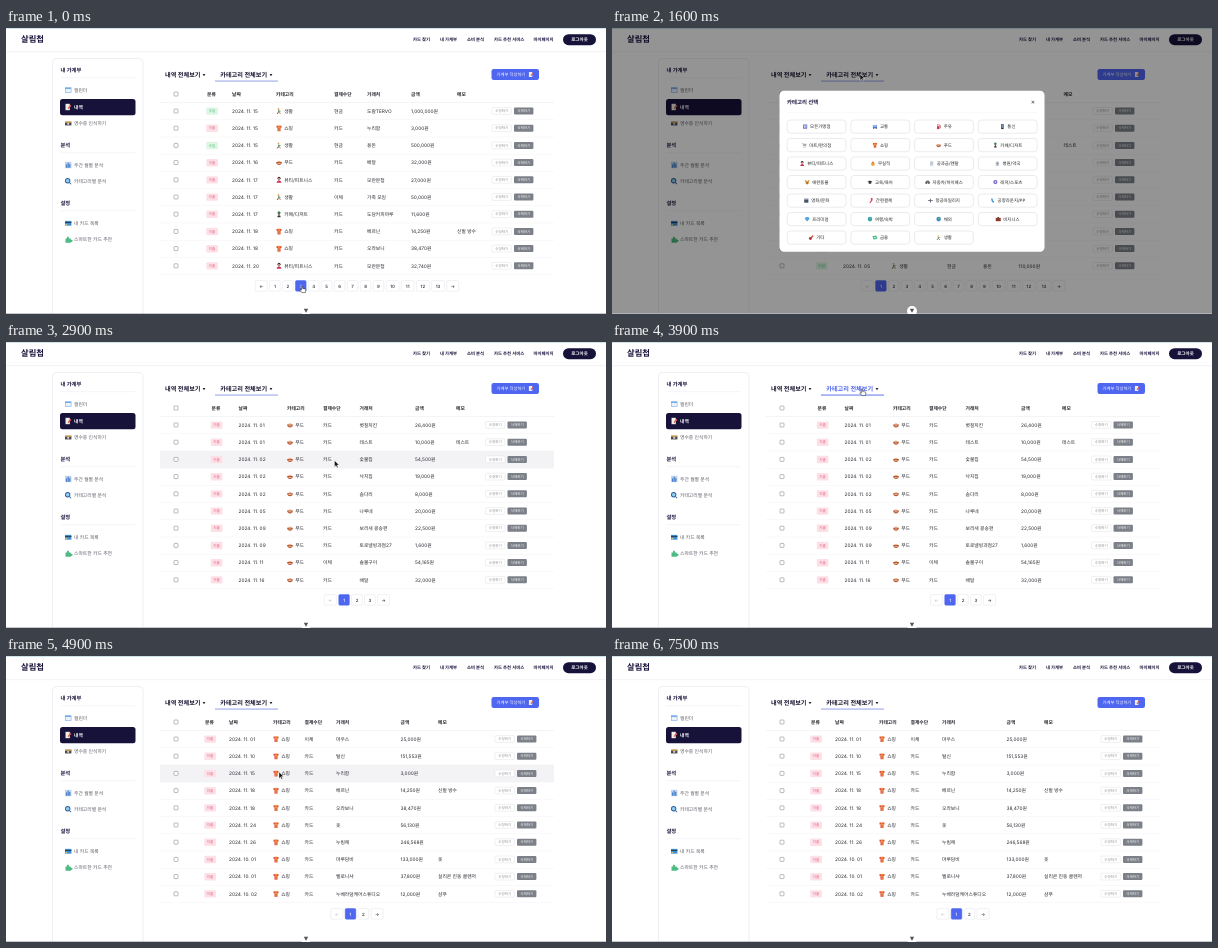
Write an HTML page that moves like this. It is 600 px wide and 286 px high and loops after 7700 ms.

```html
<!DOCTYPE html>
<html lang="ko">
<head>
<meta charset="utf-8">
<title>가계부</title>
<style>
  html, body { margin: 0; width: 100%; height: 100%; overflow: hidden; background: #fff; }
  svg { display: block; width: 600px; height: 286px; }
  text { font-family: Inter, 'Noto Sans CJK KR', 'Noto Sans CJK', sans-serif; text-rendering: geometricPrecision; white-space: pre; }
  .off { display: none; }
  .opt rect { fill: #fff; stroke: #e2e3e9; }
  .opt text { fill: #222; }
  .opt.hover rect { fill: #f5f7ff; stroke: #5a70f2; }
  .opt.hover text { fill: #5a70f2; }
  .opt.on rect { fill: #4f66f0; stroke: #4f66f0; }
  .opt.on text { fill: #fff; }
  #tab { fill: #16132e; }
  #tabLine { fill: #8c96e6; }
  .lit #tab, .lit #tabLine { fill: #4f66f0; }
</style>
</head>
<body>
<svg id="stage" viewBox="0 0 600 286"></svg>
<script>
const LOOP = 7700, STEP = 100, ROW0 = 83, PITCH = 17.2;
const INK = '#16123a', BLUE = '#4f66f0';

// Drawing helpers
const text = (s, x, y, size = 4.8, o = {}) =>
  `<text x="${x}" y="${y + size * 0.36}" font-size="${size}px" font-weight="${o.w || 400}"` +
  ` text-anchor="${o.a || 'start'}"${o.id ? ` id="${o.id}"` : ` fill="${o.c || '#26262e'}"`}>${s}</text>`;
const mid = (s, x, y, size, c, w) => text(s, x, y, size, { a: 'middle', c, w });
const rect = (x, y, w, h, fill, r = 0, more = '') =>
  `<rect x="${x}" y="${y}" width="${w}" height="${h}" rx="${r}" fill="${fill}" ${more}/>`;
const edge = (c, w = 0.5) => `stroke="${c}" stroke-width="${w}"`;
const dot = (x, y, r) => `M${x - r} ${y}a${r} ${r} 0 1 0 ${2 * r} 0a${r} ${r} 0 1 0 ${-2 * r} 0z`;
const box = (x, y, w, h) => `M${x} ${y}h${w}v${h}h${-w}z`;

// Small pictograms on a 12 x 12 grid: colour, path, colour, path ...
const person = c => ['#3a2530', dot(6, 3, 3), '#f0b98c', dot(6, 4, 1.8), c, 'M1 12q1-5 5-5t5 5z'];
const car = c => [c, 'M0 5h2l2-3h5l2 3h1v4h-12z', '#333', dot(3, 9, 1.5) + dot(9, 9, 1.5)];
const globe = c => [c, dot(6, 6, 5.5), '#67b96b', 'M3 3l4-1 1 3-3 2zM6 8l4-1-2 4z'];
const sheet = c => ['#d7dce6', box(2, 0, 8, 12), c, box(3, 2, 6, 1) + box(3, 5, 6, 1) + box(3, 8, 4, 1)];
const runner = ['#e8a35d', dot(5, 2, 1.8), '#6f9c77', 'M4 4l4 1 2 2-2 0-1 0 0 2-3 0z', '#8a6544', 'M4 8l2 1-3 3h-2zM6 8l3 2v2h-1z'];
const ICONS = {
  '캘린더': ['#6da7e6', box(0, 1, 12, 10), '#e9f3fd', box(1, 4, 10, 6)],
  '내역': ['#f1f0e8', box(1, 0, 8, 12), '#e05a4e', 'M5 8l5-6 2 2-6 6z'],
  '영수증 인식하기': ['#4a4a50', box(0, 3, 12, 7), '#e8a13c', box(0, 3, 12, 2), '#cfd4dd', dot(6, 7, 2)],
  '주간 월별 분석': ['#b9d3f0', box(0, 0, 12, 12), '#3f78c4', box(2, 5, 2, 6) + box(5, 2, 2, 9) + box(8, 4, 2, 7)],
  '카테고리별 분석': ['#2c5c94', dot(5, 5, 5), '#8fd0f2', dot(5, 5, 3.4), '#2c5c94', 'M8 9l1-1 3 3-1 1z'],
  '내 카드 목록': ['#3f8fd0', box(0, 2, 12, 9), '#27415f', box(0, 4, 12, 2), '#f0cf62', box(1, 8, 3, 2)],
  '스마트한 카드 추천': ['#4dbb83', 'M1 4h3a2 2 0 1 1 3 0h4v3a2 2 0 1 1 0 3v2h-10z'],
  '모든가맹점': ['#5d6fd0', box(1, 1, 10, 10), '#fff', box(3, 3, 2, 6) + box(7, 3, 2, 6)],
  '교통': ['#4878d8', box(1, 2, 10, 8), '#cfe2fa', box(2, 3, 8, 3), '#333', dot(3, 10, 1.2) + dot(9, 10, 1.2)],
  '주유': ['#d63b45', box(2, 1, 6, 11), '#f4dede', box(3, 2, 4, 3), '#8c3038', box(9, 3, 1.5, 7)],
  '통신': ['#33373f', box(3, 0, 6, 12), '#7b95b5', box(4, 1, 4, 8)],
  '마트/편의점': ['#a9adb6', 'M0 1h3l1 2h8l-2 6h-6l-2-6z', '#666', dot(5, 11, 1) + dot(9, 11, 1)],
  '쇼핑': ['#e2512f', box(1, 1, 10, 4), '#d83a2b', box(3, 5, 6, 7), '#f3b04a', box(5, 0, 2, 12)],
  '푸드': ['#e9b48b', 'M2 5q4-5 8 0z', '#b9552f', 'M0 5h12q-1 6-6 6t-6-6z', '#f3dfc4', box(3, 7, 6, 1.4)],
  '카페/디저트': ['#4a7d4f', dot(6, 3, 3), '#43302b', box(5, 5, 2, 7) + box(3, 9, 6, 3)],
  '뷰티/피트니스': person('#c8315f'),
  '무실적': ['#f0a43c', dot(6, 7, 4.5), '#d96a3b', 'M6 0l3 5h-6z'],
  '공과금/렌탈': sheet('#7d8798'),
  '병원/약국': ['#c9ced6', box(2, 1, 8, 11), '#8c929d', box(5, 3, 2, 6) + box(3, 5, 6, 2)],
  '애완동물': ['#dca04f', dot(6, 7, 4.5) + dot(2, 3, 2) + dot(10, 3, 2), '#4b3324', dot(6, 8, 1.5)],
  '교육/육아': ['#33363d', 'M0 5l6-3 6 3-6 3zM3 7h6v3h-6z'],
  '자동차/하이패스': car('#6b7482'),
  '레저/스포츠': ['#7d67c9', dot(6, 6, 5), '#e6e1f7', dot(6, 6, 2)],
  '영화/문화': ['#46506a', box(1, 3, 10, 8), '#8090b0', box(1, 1, 10, 2)],
  '간편결제': ['#d8455a', 'M6 0h4v5l-5 7h-3l4-6z'],
  '항공마일리지': ['#5a6470', 'M0 5h4l2-4h1v4h5v2h-5v4h-1l-2-4h-4z'],
  '공항라운지/PP': ['#4b9ad8', 'M2 1h4l1 5 3 2-2 4-4-4z'],
  '프리미엄': ['#58a5e2', 'M3 1h6l3 4-6 7-6-7z'],
  '여행/숙박': globe('#35a0c8'),
  '해외': globe('#3f86d6'),
  '비지니스': ['#8a3b2e', box(0, 3, 12, 8), '#5e271f', box(4, 1, 4, 2)],
  '기타': ['#d2604b', 'M9 0l3 3-6 5-2-2z', '#a83a3a', dot(4, 8, 3.5)],
  '금융': ['#42b883', 'M0 3l9-2 3 7-9 3z', '#e8f7ef', dot(6, 6, 2)],
  '생활': runner
};
const icon = (name, x, y, size = 6) => {
  const p = ICONS[name];
  let s = `<g transform="translate(${x} ${y - size / 2}) scale(${size / 12})">`;
  for (let i = 0; i < p.length; i += 2) s += `<path fill="${p[i]}" d="${p[i + 1]}"/>`;
  return s + '</g>';
};

// Table views. Row: sign, date, category, payment, shop, amount, memo
const HEADS = ['분류', '날짜', '카테고리', '결제수단', '거래처', '금액', '메모'];
const VIEWS = [
  { cols: [201, 226, 270, 328, 361, 405, 451, 486], page: 3, pages: 13, rows: `
+|11. 15|생활|현금|도람TERVO|1,000,000
-|11. 15|쇼핑|카드|누리함|3,000
+|11. 15|생활|현금|용돈|500,000
-|11. 16|푸드|카드|배달|32,000
-|11. 17|뷰티/피트니스|카드|모란분첩|27,000
-|11. 17|생활|이체|가족 모임|50,000
-|11. 17|카페/디저트|카드|도담커피마루|11,600
-|11. 18|쇼핑|카드|베르닌|14,250|신발 방수
-|11. 18|쇼핑|카드|오라보니|38,470
-|11. 20|뷰티/피트니스|카드|모란분첩|32,740` },
  { cols: [204.5, 231, 279, 335, 371, 406.5, 451.5, 481], page: 1, pages: 13, rows: `
-|11. 01|쇼핑|이체|마우스|25,000
-|11. 01|푸드|카드|볏짚치킨|26,400
-|11. 01|푸드|카드|테스트|10,000|테스트
-|11. 02|푸드|카드|숯불집|54,500
-|11. 02|푸드|카드|낙지집|19,000
-|11. 02|마트/편의점|카드|RV48|1,140
-|11. 02|푸드|카드|솜다리|8,000
-|11. 02|마트/편의점|카드|RV48|12,000
+|11. 03|생활|현금|용돈|200,000
+|11. 05|생활|현금|용돈|110,000` },
  { cols: [205.5, 232.5, 281, 317, 353.5, 409, 450, 479.5], page: 1, pages: 3, rows: `
-|11. 01|푸드|카드|볏짚치킨|26,400
-|11. 01|푸드|카드|테스트|10,000|테스트
-|11. 02|푸드|카드|숯불집|54,500
-|11. 02|푸드|카드|낙지집|19,000
-|11. 02|푸드|카드|솜다리|8,000
-|11. 05|푸드|카드|나루네|20,000
-|11. 09|푸드|카드|보리새 콩송편|22,500
-|11. 09|푸드|카드|토로넬빙과점27|1,600
-|11. 11|푸드|이체|솔불구이|54,165
-|11. 16|푸드|카드|배달|32,000` },
  { cols: [199, 223, 267, 298.5, 330, 394.5, 432, 489], page: 1, pages: 2, rows: `
-|11. 01|쇼핑|이체|마우스|25,000
-|11. 10|쇼핑|카드|털신|151,553
-|11. 15|쇼핑|카드|누리함|3,000
-|11. 18|쇼핑|카드|베르닌|14,250|신발 방수
-|11. 18|쇼핑|카드|오라보니|38,470
-|11. 24|쇼핑|카드|옷|56,130
-|11. 26|쇼핑|카드|누빔채|246,568
-|10. 01|쇼핑|카드|마루담비|133,000|옷
-|10. 01|쇼핑|카드|벨로니샤|37,800|실리콘 진동 클렌저
-|10. 02|쇼핑|카드|누베라덤케어스튜디오|12,000|샴푸` }
];

const check = y => rect(168, y - 2, 4, 4, '#fff', 0.7, edge('#777'));

function tableRow(line, i, c) {
  const [sign, date, cat, pay, shop, sum, memo = ''] = line.split('|');
  const y = ROW0 + i * PITCH, inc = sign === '+';
  return check(y) +
    rect(c[0] - 0.7, y - 3.6, 11.6, 7.4, inc ? '#ddf6e4' : '#fde0e7', 1) +
    mid(inc ? '수입' : '지출', c[0] + 5.1, y, 3.6, inc ? '#4cb573' : '#e5607e') +
    text('2024. ' + date, c[1], y) + icon(cat, c[2], y) + text(cat, c[2] + 8.2, y) +
    text(pay, c[3], y) + text(shop, c[4], y) + text(sum + '원', c[5], y) + text(memo, c[6], y) +
    rect(c[7], y - 3.4, 19.4, 6.8, '#fff', 1, edge('#d9dade', 0.4)) + mid('수정하기', c[7] + 9.7, y, 3.5, '#85878f') +
    rect(c[7] + 22, y - 3.5, 19.4, 7, '#7c8088', 1) + mid('삭제하기', c[7] + 31.7, y, 3.5, '#fff', 500) +
    rect(154, y + PITCH / 2, 394, 0.4, '#f0f0f4');
}

function pager({ page, pages }) {
  const keys = ['←', ...Array.from({ length: pages }, (_, i) => i + 1), '→'];
  const width = k => isNaN(k) ? 12 : k > 9 ? 12.8 : 10.6;
  const gap = 2.35;
  let x = 351 - (keys.reduce((s, k) => s + width(k), 0) + gap * (keys.length - 1)) / 2;
  return keys.map(k => {
    const w = width(k), on = k === page, dim = k === '←' && page === 1;
    const s = rect(x, 252.6, w, 10.6, on ? BLUE : '#fff', 1.2, edge(on ? BLUE : '#e1e2e8', 0.5)) +
      mid(k, x + w / 2, 258, 4.4, on ? '#fff' : dim ? '#bbb' : '#26262e', 500);
    x += w + gap;
    return s;
  }).join('');
}

const view = (v, i) => `<g id="view${i}">` + HEADS.map((h, n) => text(h, v.cols[n], 66, 4.8, { w: 700 })).join('') +
  v.rows.trim().split('\n').map((l, n) => tableRow(l, n, v.cols)).join('') + pager(v) + '</g>';

// Page frame
const NAV = [['카드 찾기', 407], ['내 가계부', 434], ['소비 분석', 461], ['카드 추천 서비스', 488], ['마이페이지', 527.5]];
const MENU = [['내 가계부', 42], ['캘린더', 62], ['내역', 79], ['영수증 인식하기', 95.3], ['분석', 117], ['주간 월별 분석', 137],
  ['카테고리별 분석', 153.3], ['설정', 175], ['내 카드 목록', 195], ['스마트한 카드 추천', 211.5]];

const header = () => rect(0, 0, 600, 1, '#cfe3ea') + rect(0, 23.5, 600, 0.6, '#ececf2') +
  text('살림첩', 15, 11.5, 8.3, { w: 700, c: INK }) +
  NAV.map(([s, x]) => text(s, x, 11.5, 4.35, { w: 600, c: INK })).join('') +
  rect(557, 6.2, 33, 11, INK, 5.5) + mid('로그아웃', 573.5, 11.7, 4.5, '#fff', 600);

const sidebar = () => rect(46.5, 30.5, 90.5, 270, '#fff', 4, edge('#ededf3', 0.9)) +
  rect(54, 71, 75.5, 16.2, INK, 2.5) +
  MENU.map(([s, y]) => ICONS[s]
    ? icon(s, 59, y, 6.4) + text(s, 68, y, 4.8, s === '내역' ? { c: '#fff', w: 600 } : { c: '#5b5b66' })
    : text(s, 54.5, y, 5.3, { w: 600, c: INK }) + rect(54.5, y + 7.6, 74.5, 0.5, '#ececf1')).join('');

const caret = x => `<path d="M${x - 1.4} 46h2.8l-1.4 2.2z" fill="#222"/>`;
const toolbar = () => text('내역 전체보기', 159, 46.5, 6.15, { w: 600, c: '#16132e' }) + caret(198) +
  text('카테고리 전체보기', 214.3, 46.5, 6.15, { w: 600, id: 'tab' }) + caret(265) +
  '<rect id="tabLine" x="209" y="52.6" width="63" height="0.9"/>' +
  rect(485.5, 41, 47.5, 11, BLUE, 2.2) + text('가계부 작성하기', 490.5, 46.6, 4.3, { c: '#fff', w: 500 }) +
  icon('내역', 522.5, 46.5, 5) + check(66) + rect(154, 74.3, 394, 0.5, '#e8e8ee');

// Category dialog
const CATS = Object.keys(ICONS).slice(7);
const spot = i => [175.2 + i % 4 * 63.7, 92 + Math.floor(i / 4) * 18.5];
function option(name, i) {
  const [x, y] = spot(i), cy = y + 6.6, slash = name.includes('/');
  const w = (name.length * 0.92 - (slash ? 0.53 : 0) - (name.endsWith('PP') ? 0.6 : 0)) * 4.45;
  const left = x + 29.4 - (w + 7.5) / 2;
  return `<g class="opt"><rect x="${x}" y="${y}" width="58.8" height="13.2" rx="3.2" stroke-width="0.7"/>` +
    icon(name, left, cy, 5) + `<text x="${left + 7.5}" y="${cy + 1.6}" font-size="4.45px">${name}</text></g>`;
}
const dialog = () => '<g id="modal">' + rect(0, 0, 600, 286, 'rgba(0,0,0,.42)') + rect(167.5, 62.8, 265, 161, '#fff', 4.5) +
  text('카테고리 선택', 175, 74, 5.4, { w: 600, c: INK }) + mid('×', 421, 74, 6.5, '#333') +
  rect(175, 84, 250, 0.4, '#f0f0f4') + CATS.map(option).join('') + '</g>';

const pull = () => rect(0, 285.2, 600, 0.8, '#b9bcc4') + `<path d="${dot(300, 283, 5)}" fill="#fff"/>` +
  '<path d="M297.8 280.8h4.4l-2.2 4z" fill="#555"/>';

const pointer = () => '<g id="cursor"><path id="arrow" d="M0 0v6.4l1.5-1.4 1.1 2.3 1-.5-1.1-2.2h2z" fill="#111" stroke="#fff" stroke-width=".4"/>' +
  '<path id="hand" d="M-.6 0q.6-.6 1.2 0v2.4l2.6.6q.8.2.7 1l-.5 2.6h-3.6l-2-2.6q.2-.8 1.6 0z" fill="#fff" stroke="#111" stroke-width=".5"/></g>';

stage.innerHTML = header() + sidebar() + toolbar() + '<rect id="band" x="154" width="394" height="17" fill="#f3f3f6"/>' +
  VIEWS.map(view).join('') + dialog() + pull() + pointer();

// Timeline
const PATH = [[0, 296, 258], [200, 294, 258], [500, 269, 258], [700, 269, 258], [1400, 246, 43], [1600, 248, 46],
  [2500, 326, 117], [2800, 328.5, 118.5], [3200, 328.5, 118.5], [3800, 250, 47], [4100, 250, 47],
  [4700, 273, 116], [5600, 273, 116], [6300, 268, -12], [LOOP, 268, -12]];
const CUTS = [[4900, 3], [2900, 2], [600, 1], [0, 0]];
const $ = id => document.getElementById(id);
const opts = [...document.querySelectorAll('.opt')];
const show = (el, on) => el.classList.toggle('off', !on);
const inside = (x, y, l, t, w, h) => x >= l && x <= l + w && y >= t && y <= t + h;

function cursorAt(t) {
  const i = PATH.findIndex(p => p[0] > t), [t0, x0, y0] = PATH[i - 1], [t1, x1, y1] = PATH[i];
  const k = (t - t0) / (t1 - t0), e = k * k * (3 - 2 * k);
  return [x0 + (x1 - x0) * e, y0 + (y1 - y0) * e];
}

function draw(ms) {
  const t = Math.floor(ms % LOOP / STEP) * STEP;
  const [x, y] = cursorAt(t);
  const now = CUTS.find(c => t >= c[0])[1];
  const open = (t >= 1500 && t < 2900) || (t >= 4000 && t < 4900);
  const onTab = !open && inside(x, y, 209, 40, 63, 13);
  const row = Math.floor((y - ROW0) / PITCH + 0.5);
  let link = onTab || (!open && inside(x, y, 249, 252, 204, 11));

  VIEWS.forEach((_, i) => show($('view' + i), i === now));
  show($('modal'), open);
  opts.forEach((o, i) => {
    const hit = open && inside(x, y, ...spot(i), 58.8, 13.2);
    link = link || hit;
    o.classList.toggle('hover', hit);
    o.classList.toggle('on', now === 2 && CATS[i] === '푸드');
  });
  stage.classList.toggle('lit', onTab);
  show($('band'), !open && row >= 0 && row < 10);
  $('band').setAttribute('y', ROW0 + row * PITCH - 8.5);
  show($('hand'), link);
  show($('arrow'), !link);
  $('cursor').setAttribute('transform', `translate(${x} ${y})`);
}

const start = performance.now();
(function tick() {
  draw(performance.now() - start);
  requestAnimationFrame(tick);
})();
</script>
</body>
</html>
```
